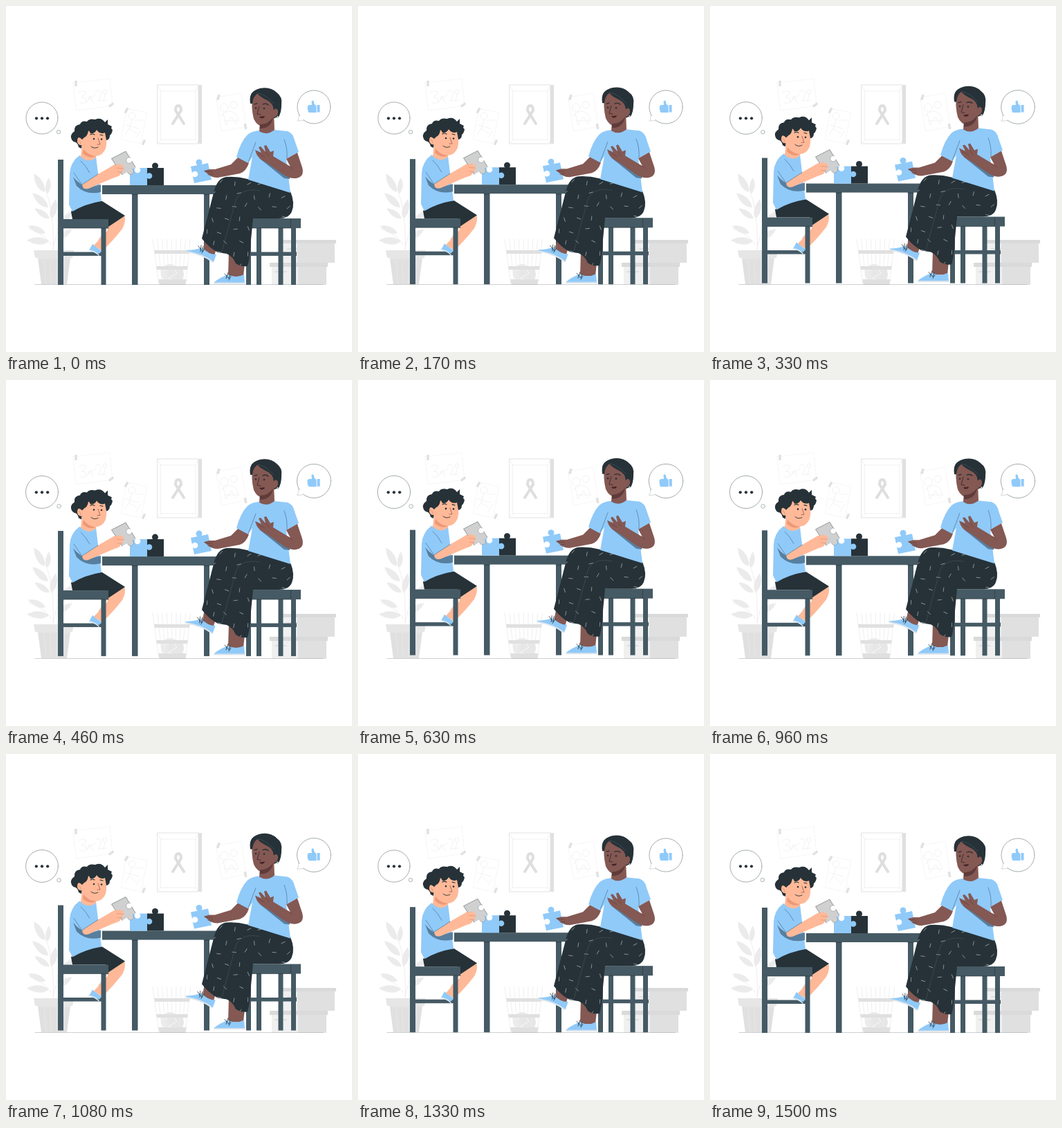
Recreate the animation shown at these times as an HTML page with a canvas. Size 500 px wide and 500 px high, loop 1.54 s.

```html
<!DOCTYPE html>
<html lang="en">
<head>
<meta charset="utf-8">
<title>Puzzle time</title>
<style>
html, body { margin: 0; width: 100%; height: 100%; overflow: hidden; background: #fff; }
canvas { display: block; width: 100vmin; height: 100vmin; }
</style>
</head>
<body>
<canvas id="stage" width="500" height="500"></canvas>
<script>
const ctx = document.getElementById('stage').getContext('2d');
const LOOP = 1540;
const BLUE = '#90caf9', DARK = '#263238', SLATE = '#455a64';
const PEACH = '#ffb998', BROWN = '#845853', GREY = '#e0e0e0', PALE = '#ebebeb';

function fill(d, color) {
  ctx.fillStyle = color;
  ctx.fill(new Path2D(d));
}

function line(d, color = DARK, width = 0.7) {
  ctx.strokeStyle = color;
  ctx.lineWidth = width;
  ctx.lineCap = ctx.lineJoin = 'round';
  ctx.stroke(new Path2D(d));
}

function box(color, x, y, w, h) {
  ctx.fillStyle = color;
  ctx.fillRect(x, y, w, h);
}

function dot(color, x, y, r, outline) {
  ctx.beginPath();
  ctx.arc(x, y, r, 0, Math.PI * 2);
  ctx.fillStyle = color;
  ctx.fill();
  if (outline) {
    ctx.strokeStyle = outline;
    ctx.lineWidth = 0.5;
    ctx.stroke();
  }
}

function at(x, y, angle, scale, draw) {
  ctx.save();
  ctx.translate(x, y);
  ctx.rotate(angle);
  ctx.scale(scale, scale);
  draw();
  ctx.restore();
}

function leaf(x, y, angle, length) {
  at(x, y, angle, length / 30, () => {
    fill('M0 0C-7 -6 -7 -18 -1 -30C6 -20 6 -8 0 0Z', PALE);
  });
}

function plant() {
  line('M68 354C70 310 64 280 55 262M68 350C76 315 88 300 96 292M66 345C54 330 44 325 34 322', PALE, 0.9);
  leaf(56, 269, -0.5, 31);
  leaf(60, 271, 0.12, 23);
  leaf(61, 291, -0.8, 31);
  leaf(63, 307, -0.95, 26);
  leaf(66, 307, 0.25, 29);
  leaf(57, 328, -1.15, 27);
  leaf(62, 340, -1.5, 32);
  leaf(75, 326, 0.6, 26);
  leaf(80, 312, 0.9, 24);
  leaf(74, 337, 1, 26);
  fill('M46 364H93L88 402H51Z', GREY);
  fill('M40 353H98L96 364H42Z', '#e6e6e6');
  line('M46 365H93M55 367L58 401M64 367L65 401M74 367L73 401M84 367L81 401', PALE, 0.7);
}

function pictureFrame() {
  box(GREY, 277, 114, 6, 85);
  box('#fff', 219, 114, 59, 85);
  line('M219 114H278V199H219Z', GREY, 0.9);
  line('M224 123H274V193H224ZM219 114L224 123M278 114L274 123M219 199L224 193M278 199L274 193', PALE, 0.7);
  line('M241 170L253 151Q253 144 249 144Q245 144 245 151L257 170', '#dedede', 4);
}

function drawings() {
  const paper = (d) => { fill(d, '#fff'); line(d, '#f2f2f2', 0.7); };
  const sketch = (d) => line(d, '#efefef', 0.8);
  paper('M97 111L150 105L154 144L102 151Z');
  paper('M174 148L204 154L195 199L167 193Z');
  paper('M304 132L340 126L347 174L312 181Z');
  sketch('M105 125Q114 120 116 126L109 132Q118 131 115 139Q110 143 106 138M117 139L121 130L126 140M119 135L130 128M129 124Q137 119 138 128L133 137L145 136M140 124A3 3 0 1 1 146 124A3 3 0 1 1 140 124M143 128L141 138');
  sketch('M177 159A5 5 0 1 1 187 159A5 5 0 1 1 177 159M187 165L199 165M182 165L178 177L172 186M178 177L188 184M173 172L192 177M188 190L195 180');
  sketch('M309 147A6 6 0 1 1 321 147A6 6 0 1 1 309 147M324 143A5 5 0 1 1 334 143A5 5 0 1 1 324 143M311 159Q323 146 333 157L336 166M314 155L318 172L326 160L333 171M316 166H336');
  const tapes = [[101, 112, 0], [152, 143, 0.9], [174, 151, 0.5], [199, 197, 0.4], [307, 132, 0.3], [346, 174, -0.2]];
  for (const [x, y, angle] of tapes) at(x, y, angle, 1, () => box(GREY, -1.7, -4, 3.4, 8));
}

function bin() {
  dot(PALE, 237, 386, 13);
  dot('#e6e6e6', 245, 388, 12);
  line('M228 383L239 376L247 386L234 394L250 397', '#fafafa', 1);
  for (let i = 0; i < 9; i++) line(`M${212 + i * 6.8} 337L${221 + i * 4.8} 402`, PALE, 0.8);
  fill('M214 353H266L265 358H215Z', GREY);
  fill('M217 376H263L262 381H218Z', GREY);
  fill('M220 395H261L259 403H222Z', GREY);
}

function boxes() {
  box('#f0f0f0', 401, 343, 20, 28);
  box(GREY, 421, 342, 54, 29);
  box('#dadada', 397, 338, 80, 5);
  box('#f0f0f0', 384, 376, 38, 27);
  box(GREY, 422, 376, 41, 27);
  box('#dadada', 381, 371, 84, 6);
  line('M407 351H421M389 384H405', GREY, 2);
}

function bubbles(scale) {
  at(52, 162, 0, scale, () => {
    dot('#fff', 24, 20, 2.7, '#607078');
    dot('#fff', 0, 0, 23, '#4d595e');
    for (const x of [-8, 0, 8]) dot(DARK, x, 0.3, 2.1);
  });
  at(445, 146, 0, scale, () => {
    dot('#fff', 0, 0, 24, '#4d595e');
    fill('M-20 12L-24 20L-13 18Z', '#fff');
    line('M-22 11Q-21 17 -24 20Q-18 20 -14 19', '#aab2b6', 0.5);
    fill('M8.5 -3H4.5V7.5H8.5ZM3.5 -2Q-0.5 -4 0 -8Q-2 -11 -3.5 -8L-3 -3H-7Q-10 -2 -9 1Q-10 3 -8.5 5Q-9 8 -6 8H3.5Z', BLUE);
  });
}

function table() {
  box(SLATE, 182, 270, 8.5, 133);
  box(SLATE, 286, 270, 8, 133);
  box(SLATE, 139, 259, 216, 13);
  line('M182 272.5H190M286 272.5H294', DARK, 0.6);
}

function tablePieces() {
  box(DARK, 204, 234, 24, 25);
  dot(DARK, 215.5, 231, 4.5);
  box(BLUE, 179, 234, 25, 25);
  dot(BLUE, 207, 245.5, 4.3);
  dot('#fff', 190, 237, 4.3);
}

function boyFace() {
  fill('M110 200L108 218Q120 228 130 219L129 208Z', PEACH);
  fill('M108 180Q121 172 143 180Q147 195 144 206Q140 216 130 217Q116 216 109 203Q103 202 103 194Q105 188 109 192Z', PEACH);
  fill('M112 207Q119 216 130 217Q121 222 111 213Z', '#ed9877');
  fill('M109 206L105 204Q104 199 101 197Q95 196 94 190Q93 185 99 181Q98 172 107 171Q109 165 117 167Q120 162 129 164Q137 160 143 168L147 164L147 171L153 174Q151 177 154 179Q153 185 150 187Q150 193 145 194Q144 188 143 183Q136 186 131 179Q128 185 122 184Q121 181 119 180Q118 188 113 190L110 193Z', DARK);
  fill('M110 193Q103 186 103 196Q104 202 110 201Z', PEACH);
  line('M105 194Q108 195 108 199', '#d5876a', 0.7);
  line('M122 186Q125 184 128 186M136 186L140 187', DARK, 1.1);
  dot(DARK, 127, 192, 1.3);
  dot(DARK, 138, 192.5, 1.3);
  line('M133 191L136 200L132 200', '#9d5847', 0.8);
  line('M123 203Q127 207 133 204', DARK, 0.9);
}

function greyPiece() {
  dot('#d0d0d0', 180, 239, 4.5, '#78828a');
  fill('M152.5 220.5L173 210L187 233L168 244Z', '#d0d0d0');
  line('M168 244L152.5 220.5L173 210L187 233', '#59646a', 0.6);
  dot('#fff', 178, 223, 4.3, '#78828a');
  dot('#fff', 183, 221, 3);
}

function boy(headLift) {
  box(SLATE, 75, 222, 8, 181);
  box(SLATE, 82, 355.5, 57, 5.5);
  fill('M120 353L125 344L138 354L135 358L130 357Z', BLUE);
  line('M120 353Q128 354 134 360', '#dce9f3', 1.4);
  fill('M146 306L171 302Q174 311 168 322Q154 340 139 354L127 346L147 324Z', PEACH);
  line('M147 320L134 338', '#de8f70', 0.7);
  fill('M94 297L108 283L139 282L172 303L148 319L144 308H96Z', DARK);
  fill('M106 216Q120 222 130 217L133 242L138 282Q114 286 96 297L91 287L92 242Q93 226 106 216Z', BLUE);
  fill('M97 247Q106 259 121 262L137 258V269Q116 274 102 260Z', '#577f9f');
  fill('M110 257L133 243L152 232Q158 227 166 230L170 236L164 245L154 249L119 264Q110 266 110 257Z', PEACH);
  fill('M102 220Q114 216 122 227L133 243L110 258L98 240Q93 227 102 220Z', BLUE);
  line('M110 258L133 243M108 224Q115 230 121 241M98 241L109 257', '#426684', 0.6);
  ctx.save();
  ctx.translate(0, -headLift);
  boyFace();
  ctx.restore();
  greyPiece();
  fill('M151 233L163 228L170 231L169 238L162 246L151 249Z', PEACH);
  line('M160 234L170 235M161 240L168 240', '#d98a6d', 0.6);
  box(SLATE, 75, 308, 73, 13);
  box(SLATE, 137.5, 319, 7, 84);
  line('M83 321H148', DARK, 0.6);
}

function stool() {
  for (const x of [347, 362, 393.5, 412]) box(SLATE, x, 318, 7, 85);
  box(SLATE, 347, 355.5, 73, 5.5);
  box(SLATE, 346, 307, 80, 14);
  line('M411.5 308V320M354 321H412', DARK, 0.6);
}

function womanFace() {
  fill('M353 137Q351 123 367 119Q382 116 391 125Q400 131 398 143L395 159L386 163L365 139Z', DARK);
  fill('M367 166L366 181Q377 188 388 179L387 154Z', BROWN);
  fill('M356 131Q354 147 358 163Q363 174 372 174Q383 173 387 161Q394 159 393 151Q391 146 387 150Q386 140 379 137Q366 131 363 126Z', BROWN);
  fill('M367 171Q379 171 386 161Q383 177 367 177Z', '#5f3b39');
  fill('M353 141Q350 122 370 119Q396 118 398 142Q398 155 394 159Q395 147 390 147L387 150Q387 141 376 135Q368 131 364 126Q357 130 356 141Z', DARK);
  line('M364 126Q376 128 387 141', SLATE, 0.6);
  line('M359 142L363 141M371 142Q376 140 379 143', DARK, 1.3);
  dot(DARK, 361, 147.5, 1.3);
  dot(DARK, 373, 148, 1.3);
  line('M366 145L363 156L368 157', '#3f2729', 0.9);
  fill('M366 160L374 159Q373 163 368 162Z', '#452427');
  dot('#fff', 392.5, 160, 1.2, DARK);
}

function heldPiece() {
  fill('M267 232L292 227L297 251L272 256Z', BLUE);
  dot(BLUE, 279, 226, 4.5);
  dot('#fff', 273, 243, 4.3);
  dot('#fff', 268, 244, 2.8);
}

function shoe(d, sole, laces) {
  fill(d, BLUE);
  line(sole, '#dce4ea', 2);
  line(laces, DARK, 0.8);
}

const pants = 'M349 250L411 268Q418 285 413 297Q409 307 394 307H357L354 338Q353 363 349 376Q339 377 332 372Q328 362 319 358L306 356Q293 349 283 336L301 266Q306 249 318 247Q334 246 349 250Z';

function trousers() {
  fill(pants, DARK);
  ctx.save();
  ctx.clip(new Path2D(pants));
  let seed = 17;
  const random = () => (seed = seed * 16807 % 2147483647) / 2147483647;
  for (let row = 0; row < 8; row++) {
    for (let col = 0; col < 7; col++) {
      const x = 286 + col * 20 + (row % 2) * 10 + random() * 6;
      const y = 253 + row * 17 + random() * 7;
      const angle = random() * Math.PI;
      at(x, y, angle, 1, () => line('M-2.8 0H2.8', '#b4bcc0', 0.65));
    }
  }
  line('M367 267Q339 262 332 281L312 355', '#46545c', 0.6);
  ctx.restore();
}

function woman(swing) {
  fill('M322 355L345 372L343 391H321Z', BROWN);
  shoe('M301 399Q308 393 321 388Q332 394 344 388L345 401H301Z', 'M301 400.5H345', 'M316 387L322 394L324 388M318 394L321 385M325 391L322 396');
  ctx.save();
  ctx.translate(-swing, 0);
  fill('M289 332L305 347L301 361L285 353Z', BROWN);
  shoe('M261 353Q272 353 284 349Q292 359 304 359L300 370Q281 358 261 355Z', 'M262 355Q285 359 299 370', 'M278 347L284 355L285 347M281 355L282 346M287 351L283 357');
  ctx.restore();
  trousers();
  heldPiece();
  fill('M336 218L351 227Q347 239 338 242L306 248Q297 248 292 243L286 238L294 236L302 236L325 229Z', BROWN);
  line('M287 239L298 240M292 244L299 243', '#613d3c', 0.6);
  fill('M365 180Q377 187 388 179L407 181Q415 184 417 194L423 211L405 221L411 270L350 251L356 218L350 227L333 218Q339 196 349 186Q355 181 365 180Z', BLUE);
  line('M361 197L350 226M402 193Q407 205 406 220', '#426684', 0.6);
  fill('M366 220L402 249L410 250L411 242L390 222Z', '#577f9f');
  fill('M405 221L421 212L428 233Q432 247 419 249Q410 250 400 243L376 226Q365 221 362 214L360 208L369 212L365 204L368 203L375 211L373 202L376 201L382 211L387 209L386 217L411 232Z', BROWN);
  line('M365 213L374 218M375 211L380 217M409 231L414 235', '#613d3c', 0.6);
  womanFace();
}

function render(time) {
  const rise = (1 - Math.cos((time + 20) / LOOP * Math.PI * 2)) / 2;
  box('#fff', 0, 0, 500, 500);
  plant();
  pictureFrame();
  drawings();
  bin();
  boxes();
  line('M42 402.5H458', '#a9afb2', 0.6);
  bubbles(1 + 0.03 * rise);
  ctx.save();
  ctx.translate(0, -5.7 * rise);
  table();
  tablePieces();
  boy(0.8 * rise);
  stool();
  woman(2 * rise);
  ctx.restore();
}

function tick(now) {
  render(now % LOOP);
  requestAnimationFrame(tick);
}
requestAnimationFrame(tick);
</script>
</body>
</html>
```
